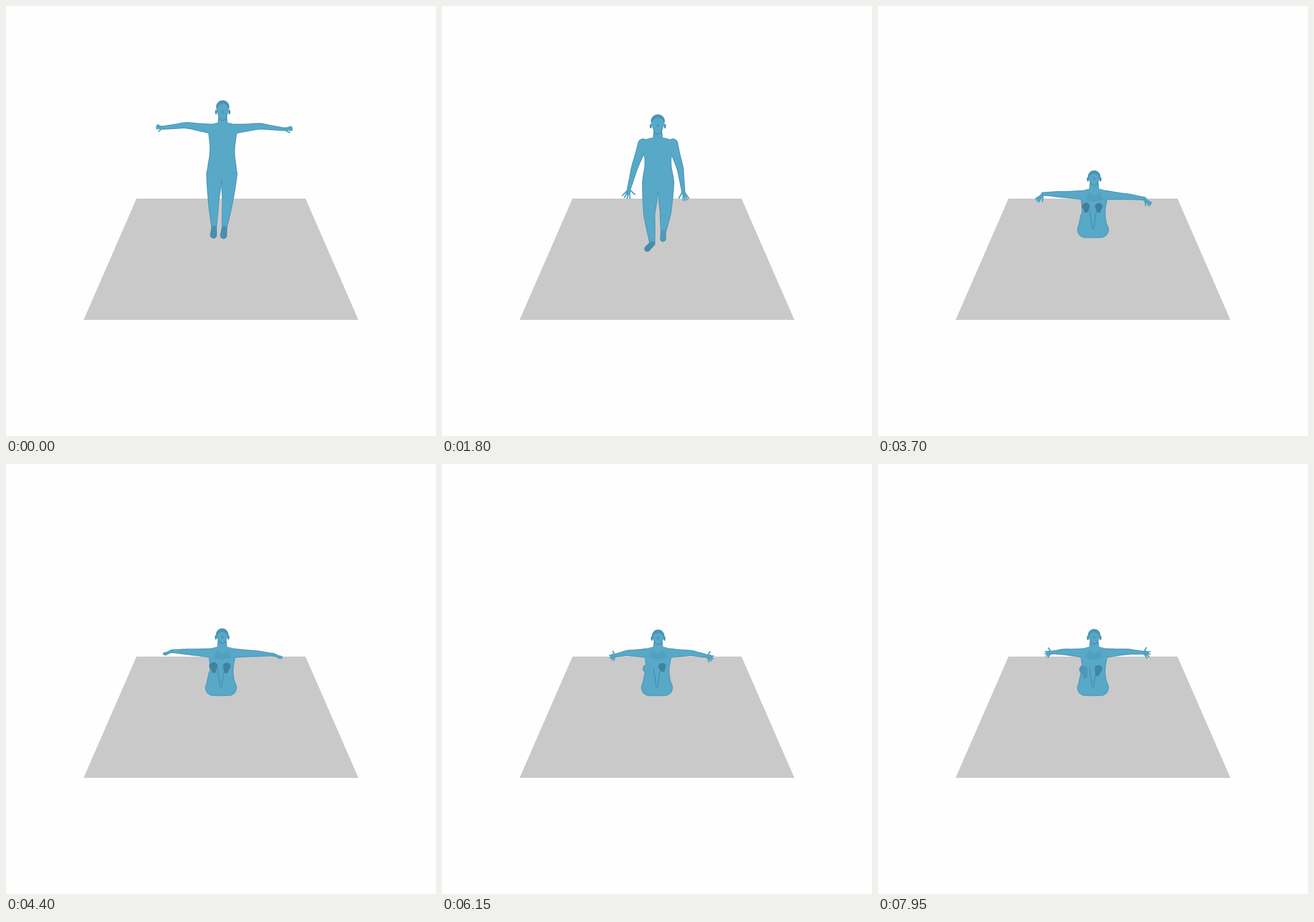
An HTML page that plays this animation: 748 by 748 pixels, repeating every 8000 ms.

```html
<!DOCTYPE html>
<html lang="en">
<head>
<meta charset="utf-8">
<title>Body motion</title>
<style>
  html, body { margin: 0; width: 100%; height: 100%; overflow: hidden; background: #fefefe; }
  svg { display: block; width: 100%; height: 100%; }
</style>
</head>
<body>
<svg viewBox="0 0 748 748">
  <path d="M227 335H521L613 546H135Z" fill="#c9c9c9"/>
  <g id="figure"></g>
</svg>
<script>
const LOOP = 8000, STEP = 50;
const BASE = [88, 168, 200], EDGE = [73, 148, 180], DARK = [62, 127, 156];

// head: top, height; pelvis and foot: radius; crease: half gap and y, top then bottom
// arm: lift and length of upper arm, forearm and hand, then thumb turn (0 hangs, 90 points outward)
// leg: knee, ankle, toe; tone: darkness of feet and arms, left then right; fold: seated shading
const stand = {
  scale: 1, head: [164, 36], chest: [377, 213], hip: [375.5, 292], pelvis: 9, foot: 6,
  arms: [[98, 46, 84, 40, 93, 13, -40], [96, 46, 83, 40, 90, 18, -25]],
  legs: [[361, 340, 362, 386, 361, 398.5], [385.5, 340, 380, 386, 378.5, 399]],
  crease: [1, 300, 1, 304], tone: [.6, .6, 0, 0], fold: 0
};
const step = {
  scale: 1.06, head: [188.5, 36], chest: [375.5, 239], hip: [376, 308], pelvis: 10, foot: 5.2,
  arms: [[20, 43, 15, 39, 10, 18, -57], [17, 45, 8, 38, 11, 19, -40]],
  legs: [[360.5, 363, 366, 413, 357, 422.5], [389, 358, 385, 393, 384.5, 405]],
  crease: [1, 318, 1, 322], tone: [.65, .35, 0, 0], fold: 0
};
const walk = { ...step, head: [182, 36], chest: [375.5, 233] };
const crouch = {
  scale: .98, head: [299.5, 35], chest: [372.5, 340], hip: [374.5, 388], pelvis: 14.5, foot: 5.2,
  arms: [[22, 20, 5, 12, 15, 12, -45], [2, 22, -62, 17, -90, 9, -30]],
  legs: [[345, 368, 367, 406, 359, 413], [403, 367, 378, 403, 379, 412]],
  crease: [24, 366, 5, 402], tone: [.5, .7, .6, .85], fold: .7
};
const sit = {
  scale: .94, head: [286, 27], chest: [376, 328], hip: [374, 389], pelvis: 14.5, foot: 8,
  arms: [[92, 45, 91, 25, 38, 17, -33], [86, 43, 83, 25, 42, 16, -30]],
  legs: [[361, 366, 362, 356, 362, 349], [385, 366, 384, 356, 384, 349.5]],
  crease: [6, 355, 1, 388], tone: [1, 1, 0, 0], fold: .6
};
const reach = { ...sit, arms: sit.arms.map(([a, b, c, d]) => [a, b, c, d + 3, 65, 18, -35]) };

// Seated with open hands; d lowers the wrists and tilts the feet.
const seat = d => ({
  ...sit, head: [286 + 2 * d, 27],
  arms: [[35, 21, 13], [39, 28, 14]].map(([upper, fore, hand]) =>
    [97 - 7 * d, upper, 95 - 16 * d, fore, 88 - 22 * d, hand - 2 * d, 58 + 26 * d]),
  legs: [
    [361, 366, 361 - d, 372 - 6 * d, 359 - 2 * d, 359 - 3 * d],
    [385, 366, 379 + 5 * d, 373 - 15 * d, 384 - d, 360 - 7 * d]
  ],
  tone: [.75 - .7 * d, .75 + .2 * d, 0, 0]
});

const keys = [[0, stand], [950, stand], [1650, walk], [1800, step], [2580, crouch], [2800, crouch],
  [3700, sit], [4050, reach], [5100, seat(0)], [6150, seat(1)], [LOOP, seat(.5)]];

const mix = (a, b, k) => Array.isArray(a) ? a.map((v, i) => mix(v, b[i], k)) : a + (b - a) * k;
const ease = k => k * k * (3 - 2 * k);

function poseAt(t) {
  const i = keys.findIndex(([end]) => t < end);
  const [t0, a] = keys[i - 1], [t1, b] = keys[i];
  const k = ease((t - t0) / (t1 - t0));
  return Object.fromEntries(Object.keys(a).map(part => [part, mix(a[part], b[part], k)]));
}

const fix = v => v.toFixed(2);
const at = p => fix(p[0]) + ' ' + fix(p[1]);
const rgb = c => `rgb(${c.map(Math.round)})`;
const path = (d, fill) => `<path d="${d}" fill="${fill}"/>`;
const oval = (x, y, rx, ry, fill, alpha = 1) =>
  `<ellipse cx="${fix(x)}" cy="${fix(y)}" rx="${fix(rx)}" ry="${fix(ry)}" fill="${fill}" opacity="${fix(alpha)}"/>`;
const line = (d, color, width, alpha = 1) =>
  `<path d="${d}" fill="none" stroke="${color}" stroke-width="${fix(width)}" stroke-linecap="round" opacity="${fix(alpha)}"/>`;

// Smooth curve through points, continuing from the first one.
function smooth(p) {
  let d = '';
  for (let i = 0; i < p.length - 1; i++) {
    const a = p[i - 1] || p[i], b = p[i], c = p[i + 1], e = p[i + 2] || c;
    d += `C${at([b[0] + (c[0] - a[0]) / 6, b[1] + (c[1] - a[1]) / 6])} ` +
      `${at([c[0] - (e[0] - b[0]) / 6, c[1] - (e[1] - b[1]) / 6])} ${at(c)}`;
  }
  return d;
}

// Outline of a tapered limb through points [x, y, half width].
function limb(points, inset = 0, round = true) {
  const left = [], right = [];
  points.forEach(([x, y, w], i) => {
    const a = points[i - 1] || points[i], b = points[i + 1] || points[i];
    const dx = b[0] - a[0], dy = b[1] - a[1], n = (w - inset) / (Math.hypot(dx, dy) || 1);
    left.push([x - dy * n, y + dx * n]);
    right.unshift([x + dy * n, y - dx * n]);
  });
  const cap = (w, p) => round ? `A${fix(w - inset)} ${fix(w - inset)} 0 0 0 ${at(p)}` : 'L' + at(p);
  return 'M' + at(left[0]) + smooth(left) + cap(points.at(-1)[2], right[0]) +
    smooth(right) + cap(points[0][2], left[0]) + 'Z';
}

const rad = deg => deg * Math.PI / 180;
const go = ([x, y], side, lift, r) => [x + side * r * Math.sin(rad(lift)), y + r * Math.cos(rad(lift))];
const thick = (points, widths, s) => points.map((p, i) => [...p, widths[i] * s]);

function torso({ chest: [x, y], hip, scale }) {
  const points = [[x, y - 10, 9.5 * scale], [x, y - 7, 20 * scale]];
  for (let t = 0; t < 1.01; t += .2) {
    const w = 25 + 1.5 * t - 3.8 * Math.sin(Math.PI * t) ** 2;
    points.push([...mix([x, y], hip, t), w * scale]);
  }
  return points;
}

function armOf({ chest, scale }, side, [lift, upper, bend, fore, aim, size, thumb]) {
  const shoulder = [chest[0] + side * (19 + 7 * Math.cos(rad(lift))), chest[1] + 1];
  const elbow = go(shoulder, side, lift, upper), wrist = go(elbow, side, bend, fore);
  const points = [shoulder, mix(shoulder, elbow, .5), elbow, mix(elbow, wrist, .5), wrist];
  const fan = [1, .3, 0, -.3, -.6].map(f =>
    `M${at(wrist)}L${at(go(wrist, side, aim + thumb * f, size * (1 - .15 * f * f) - 1))}`);
  return {
    sleeve: thick(points, [9, 7, 5.7, 4.4, 3.3], scale),
    palm: [[...wrist, 3], [...go(wrist, side, aim, size * .4), 2 + Math.abs(thumb) / 30]],
    fan: fan.join('')
  };
}

function legOf({ hip, scale, foot }, side, [kx, ky, ax, ay, tx, ty]) {
  const top = [hip[0] + side * 13, hip[1]], knee = [kx, ky], ankle = [ax, ay];
  return {
    thigh: thick([top, mix(top, knee, .5), knee], [14.2, 12.4, 9.6], scale),
    shin: thick([knee, mix(knee, ankle, .35), ankle], [9.6, 8.2, 4.7], scale),
    foot: [[ax, ay, 4.8], [tx, ty, foot]]
  };
}

function draw(t) {
  const pose = poseAt(t);
  const { scale, head: [top, tall], chest: [x, y], hip, tone, fold, crease: [g0, y0, g1, y1] } = pose;
  const base = rgb(BASE), edge = rgb(EDGE), dark = rgb(DARK);
  const both = (make, list) => list.map((v, i) => make(pose, 2 * i - 1, v));
  const arms = both(armOf, pose.arms), legs = both(legOf, pose.legs);
  const r = 11.6 * scale, chin = top + tall;
  const neck = [[x, chin - 7, 7.5], [x, y - 6, 9]];
  const skull = drop => limb([[x, top + r + drop, r], [x, chin - 7.5, 7.5]], drop * .5);

  const layer = inset => {
    const tint = k => rgb(mix(inset ? BASE : EDGE, DARK, k));
    const part = (points, k = 0) => path(limb(points, inset), tint(k));
    let s = path(limb(torso(pose), inset, false), tint(0));
    s += line(`M${at([hip[0] - 13, hip[1]])}H${fix(hip[0] + 13)}`, tint(0), 2 * (pose.pelvis - inset));
    if (inset) s += oval(x, y + 4, 19, 8, edge, fold * .7);
    legs.forEach(l => { s += part(l.thigh) + part(l.shin); });
    if (inset) {
      [-1, 1].forEach(side => {
        s += line(`M${at([hip[0] + side * g0, y0])}L${at([hip[0] + side * g1, y1])}`, dark, 1.5, fold);
      });
    }
    legs.forEach((l, i) => { s += part(l.foot, tone[i]); });
    arms.forEach((a, i) => {
      const k = tone[2 + i];
      s += part(a.sleeve, k) + part(a.palm, k) + (inset ? line(a.fan, tint(.15 + k * .7), 2.3) : '');
    });
    return s + part(neck);
  };

  figure.innerHTML = layer(0) + layer(1.2) +
    [-1, 1].map(side => oval(x + side * r, top + tall * .57, 1.8, 4, edge)).join('') +
    path(skull(0), edge) + path(skull(4), base) + oval(x, top + tall * .55, 2.6, 3, dark, .3);
}

const figure = document.getElementById('figure');
function tick() {
  draw(Math.floor(performance.now() % LOOP / STEP) * STEP);
  requestAnimationFrame(tick);
}
tick();
</script>
</body>
</html>
```
